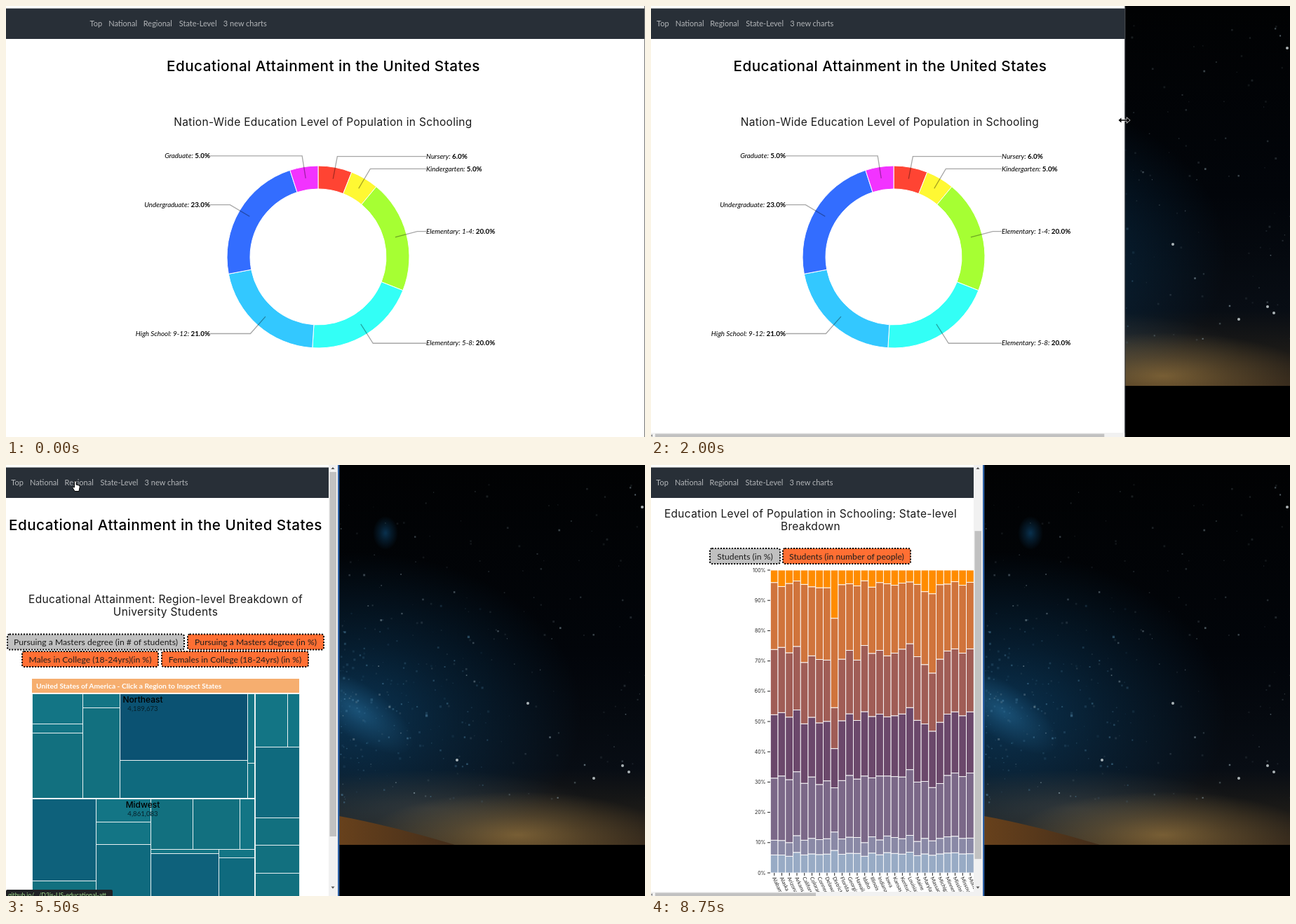
Write an HTML page that moves like this. It is 911 px wide and 615 px high and loops after 9000 ms.

```html
<!DOCTYPE html>
<html lang="en">
<head>
<meta charset="utf-8">
<title>Educational Attainment</title>
<style>
  html, body { margin: 0; width: 100%; height: 100%; overflow: hidden; background: #000; }
  svg { display: block; width: 100vw; height: 100vh; }
  text { font-family: Lato, "Open Sans", sans-serif; }
  .mid { text-anchor: middle; }
  .end { text-anchor: end; }
  .head, .sub, .region, .tick { font-family: Inter, "Open Sans", sans-serif; }
  .head { font-size: 20.7px; font-weight: 500; letter-spacing: .45px; }
  .sub { font-size: 15.5px; letter-spacing: .33px; fill: #1a1a1a; }
  .nav { font-size: 11px; fill: #b3b6b9; }
  .label { font-size: 9.85px; font-style: italic; }
  .label tspan { font-style: normal; font-weight: 700; }
  .button { font-size: 12.2px; fill: #1c1c1c; }
  .banner { font-size: 10.25px; font-weight: 700; fill: #fff; }
  .region { font-size: 12px; font-weight: 500; }
  .count { font-size: 9.6px; fill: #06202a; }
  .tick { font-size: 7px; fill: #222; }
  .state { font-size: 7.5px; fill: #222; }
  .status { font-size: 8.7px; fill: #9fdc8c; }
</style>
</head>
<body>
<svg id="stage" viewBox="0 0 911 615" preserveAspectRatio="none"></svg>
<script>
const LOOP = 9000, STEP = 250;
const stage = document.getElementById('stage');

const rect = (x, y, w, h, fill, extra = '') =>
  `<rect x="${x}" y="${y}" width="${w}" height="${h}" fill="${fill}" ${extra}/>`;
const text = (x, y, s, cls, extra = '') =>
  `<text x="${x}" y="${y}" class="${cls}" ${extra}>${s}</text>`;
const path = (d, fill, extra = '') => `<path d="${d}" fill="${fill}" ${extra}/>`;
const group = (id, body) => `<g id="${id}">${body}</g>`;
const polar = (r, turn) => [r * Math.sin(turn * 2 * Math.PI), -r * Math.cos(turn * 2 * Math.PI)];

function randomizer(seed) {
  return () => (seed = (seed * 16807) % 2147483647) / 2147483647;
}

function sky() {
  const rnd = randomizer(77);
  let stars = '';
  const star = (x, y, size, color, alpha) => {
    stars += rect(x.toFixed(1), y.toFixed(1), size.toFixed(1), size.toFixed(1), color, `opacity="${alpha.toFixed(2)}"`);
  };
  for (let i = 0; i < 190; i++)
    star(476 + 435 * rnd() ** 1.2, 25 + 455 * rnd(), 1 + 2 * rnd(), '#8fa3ad', .1 + .5 * rnd() ** 3);
  // denser bluish specks around the bright patch
  for (let i = 0; i < 170; i++)
    star(476 + 210 * rnd() ** 1.6, 345 + 150 * (rnd() + rnd() - 1), 1 + 2.5 * rnd(), '#5f9cbf', .08 + .35 * rnd() ** 2);
  for (const [x, y] of [[879, 429], [888, 438], [744, 340], [838, 447], [643, 421], [907, 60]])
    stars += `<circle cx="${x}" cy="${y}" r="2" fill="#d5dde0" opacity=".8"/>`;
  const glow = (id, color, alpha) =>
    `<radialGradient id="${id}"><stop stop-color="${color}" stop-opacity="${alpha}"/>` +
    `<stop offset=".45" stop-color="${color}" stop-opacity="${alpha * .5}"/>` +
    `<stop offset="1" stop-color="${color}" stop-opacity="0"/></radialGradient>`;
  const ellipse = (x, y, rx, ry, id, extra = '') =>
    `<ellipse cx="${x}" cy="${y}" rx="${rx}" ry="${ry}" fill="url(#${id})" ${extra}/>`;
  return `<defs>
    <linearGradient id="night" x2="0" y2="1">
      <stop stop-color="#010203"/><stop offset=".5" stop-color="#02050a"/>
      <stop offset=".8" stop-color="#080d14"/><stop offset=".9" stop-color="#1a1917"/>
      <stop offset="1" stop-color="#30251a"/></linearGradient>
    <linearGradient id="soil" x2="1"><stop stop-color="#6f451c"/><stop offset="1" stop-color="#432d1a"/></linearGradient>
    ${glow('blue', '#0c4066', .75)}${glow('core', '#2a709c', .5)}${glow('dawn', '#a07d42', .65)}${glow('haze', '#4a4a48', .5)}
    <clipPath id="photo"><rect width="911" height="542"/></clipPath></defs>
    ${rect(0, 0, 911, 615, '#000')}
    <g clip-path="url(#photo)">${rect(0, 0, 911, 542, 'url(#night)')}
    ${ellipse(500, 355, 320, 230, 'blue')}
    ${ellipse(500, 350, 95, 38, 'core', 'transform="rotate(35 500 350)"')}
    ${ellipse(541, 97, 18, 24, 'blue')}${ellipse(600, 490, 240, 55, 'haze')}${ellipse(730, 528, 215, 62, 'dawn')}
    ${stars}${path('M440 494L475 501C530 511 590 527 640 542H440z', 'url(#soil)')}</g>`;
}

function donut() {
  const slices = [
    ['Nursery', 6, '#ff4433'], ['Kindergarten', 5, '#fff833'], ['Elementary: 1-4', 20, '#a6ff33'],
    ['Elementary: 5-8', 20, '#33fff6'], ['High School: 9-12', 21, '#33c8ff'],
    ['Undergraduate', 23, '#336dff'], ['Graduate', 5, '#f233ff']];
  let from = 0, ring = '', leaders = '', labels = '';
  for (const [name, share, color] of slices) {
    const to = from + share / 100, mid = (from + to) / 2;
    ring += path(`M${polar(130, from)}A130 130 0 0 1 ${polar(130, to)}` +
      `L${polar(97, to)}A97 97 0 0 0 ${polar(97, from)}z`, color, 'stroke="#fff"');
    const elbow = polar(146, mid), side = mid < .5 ? 1 : -1;
    leaders += path(`M${polar(113.5, mid)}L${elbow}H${side * 154}`, 'none',
      'stroke="#000" stroke-opacity=".35" stroke-width="1.3"');
    labels += text(side * 154, elbow[1] + 3.2, `${name}: <tspan>${share.toFixed(1)}%</tspan>`,
      side > 0 ? 'label' : 'label end');
    from = to;
  }
  return `<g transform="translate(0 358)">${ring}${leaders}${labels}</g>`;
}

const button = (x, y, w, label, fill) =>
  rect(x + 1, y + 1, w - 2, 22, fill, 'rx="3" stroke="#000" stroke-width="2" stroke-dasharray="2 2"') +
  text(x + w / 2, y + 16.5, label, 'button mid');
const GREY = '#c0c0c0', ORANGE = '#ff6f33';

function treemap() {
  const teal = ['#137585', '#12707f', '#0f6a7e', '#0b5272', '#0e617b'];
  // left, top, right, bottom, shade
  const cells = `37 326 109 369 0|37 369 109 382 0|37 382 109 475 1|109 326 162 346 0|109 346 162 475 1
    |162 326 344 421 3|162 421 344 475 2|344 326 354 425 0|344 425 354 475 0
    |355 326 401 402 0|401 326 418 402 0|355 402 418 503 2|355 503 418 542 1|355 542 418 582 1|355 582 418 622 1
    |37 476 128 593 4|37 593 128 622 1|128 476 206 509 0|128 509 206 541 0|128 541 206 622 2
    |206 476 266 548 1|266 476 333 548 1|333 476 354 548 0|206 548 303 554 0|206 554 303 622 4
    |303 548 354 560 0|303 560 354 622 2`;
  return cells.split('|').map(cell => {
    const [l, t, r, b, shade] = cell.trim().split(' ').map(Number);
    return rect(l + .5, t + .5, r - l, b - t, teal[shade], 'stroke="#e9f2f3"');
  }).join('') +
    text(195, 339, 'Northeast', 'region mid') + text(195, 350.5, '4,189,673', 'count mid') +
    text(195, 489, 'Midwest', 'region mid') + text(195, 500.5, '4,861,083', 'count mid');
}

function regionPage() {
  return text(227.5, 197, 'Educational Attainment: Region-level Breakdown of', 'sub mid') +
    text(227.5, 215, 'University Students', 'sub mid') +
    button(1, 240.5, 254, 'Pursuing a Masters degree (in # of students)', GREY) +
    button(258, 240.5, 196, 'Pursuing a Masters degree (in %)', ORANGE) +
    button(22, 265, 196, 'Males in College (18-24yrs)(in %)', ORANGE) +
    button(221, 265, 211, 'Females in College (18-24yrs) (in %)', ORANGE) +
    rect(37, 305, 381, 20, '#f6ae6f') +
    text(43, 318.8, 'United States of America - Click a Region to Inspect States', 'banner') +
    treemap();
}

function stackedBars() {
  const states = ('Alabama Alaska Arizona Arkansas California Colorado Connecticut Delaware District Florida ' +
    'Georgia Hawaii Idaho Illinois Indiana Iowa Kansas Kentucky Louisiana Maine Maryland Massachusetts ' +
    'Michigan Minnesota Mississippi Missouri Montana').split(' ');
  const colors = ['#98abc5', '#8a89a6', '#7b6888', '#6b486b', '#a05d56', '#d0743c', '#ff8c00'];
  const middle = [10.8, 10.7, 10, 12.3, 10.8, 11.4, 11, 11.3, 13.5, 11.2, 11.8, 11.7, 10, 11.9,
    10.9, 12.2, 11.7, 11.3, 12.4, 10.4, 11.4, 10.6, 11.4, 11.9, 12.1, 11.4, 11.5];
  const elementary = [31.3, 32, 30.8, 33.4, 29.6, 31.7, 29.2, 30.4, 28.1, 30.5, 32.2, 31, 32, 31.4,
    32, 32, 31.8, 31.7, 34.1, 30, 30.2, 28.2, 29.5, 32.2, 33, 31.8, 33];
  const school = [73.8, 74.5, 72.7, 74.8, 69.5, 71.7, 70.5, 70.3, 54.6, 70.6, 73.5, 70.3, 75.1, 72.5,
    73.5, 71.7, 72.6, 73.9, 75.7, 71.4, 68.8, 66, 70.6, 73.3, 74, 72.6, 74];
  const college = [95.9, 94.6, 95.6, 96.4, 95.3, 94.5, 94.2, 94.2, 84.1, 95.2, 95.5, 94.8, 96.5, 94.4,
    95.9, 95.5, 95, 95.7, 96.1, 95.3, 92.9, 92.2, 95.2, 95.4, 96.2, 95, 96];
  const y = p => 704 - 4.32 * p;
  let out = '';
  states.forEach((name, i) => {
    const x = 170.3 + i * 10.74;
    const half = (elementary[i] + school[i]) / 2 - .3;
    const tops = [middle[i] * .55, middle[i], elementary[i], half, school[i], college[i], 100];
    tops.forEach((top, k) => {
      const base = k ? tops[k - 1] : 0;
      out += rect(x, y(top), 10.74, 4.32 * (top - base), colors[k], 'stroke="#fff" stroke-width=".9"');
    });
    out += rect(x + 5, 704, 1, 4, '#222') +
      text(0, 0, name, 'state', `transform="translate(${x + 2.5} 711) rotate(65)"`);
  });
  for (let p = 0; p <= 100; p += 10)
    out += text(163.5, y(p) + 2.6, p + '%', 'tick end') + rect(166, y(p) - .5, 4, 1, '#222');
  return out;
}

function statePage() {
  return text(227.5, 196.5, 'Education Level of Population in Schooling: State-level', 'sub mid') +
    text(227.5, 214.5, 'Breakdown', 'sub mid') +
    button(83, 240, 102, 'Students (in %)', GREY) +
    button(187, 240, 184, 'Students (in number of people)', ORANGE) +
    stackedBars();
}

const navItems = [[0, 'Top'], [26.7, 'National'], [76.3, 'Regional'], [127.3, 'State-Level'], [190.3, '3 new charts']];
const outlined = 'stroke="#fff" stroke-width="1.2" paint-order="stroke"';

stage.innerHTML = sky() + `
  <clipPath id="window"><rect id="windowClip" height="615"/></clipPath>
  <g clip-path="url(#window)">
    ${rect(0, 0, 911, 615, '#fff')}
    <g id="content">
      ${group('heading', text(0, 92.5, 'Educational Attainment in the United States', 'head mid'))}
      ${group('national', group('nationalTitle',
        text(-.5, 171, 'Nation-Wide Education Level of Population in Schooling', 'sub mid')) + group('donut', donut()))}
      ${group('regional', regionPage())}
      ${group('states', statePage())}
    </g>
    ${rect(0, 0, 911, 4, '#fdfffd')}${rect(0, 3.5, 911, 43.5, '#282f37')}
    ${group('menu', navItems.map(([x, s]) => text(x, 29, s, 'nav')).join(''))}
    <g id="bottomBar">${rect(0, 609, 911, 6, '#f1f1f1')}
      <rect id="bottomThumb" x="6" y="610.5" height="5" fill="#c1c1c1"/>
      ${path('M2 611v4l-2-2z', '#777')}</g>
    <g id="sideBar">${rect(460, 0, 13, 615, '#f1f1f1')}
      <rect id="sideThumb" x="461.5" width="9.5" fill="#c1c1c1"/>
      ${path('M463.5 6h5l-2.5-3z', '#555')}${path('M463.5 601.5h5l-2.5 3z', '#555')}</g>
    <g id="status"><rect id="statusBox" y="606" height="12" rx="2" fill="#202124"/>
      ${text(3, 616.5, 'github.io/.../D3js-US-educational-att...', 'status')}</g>
  </g>
  <rect id="frame" y="0" height="615"/>
  ${group('resize', path('M-8 0L-4-3.5V-.8H4V-3.5L8 0L4 3.5V.8H-4V3.5z', '#000', outlined))}
  ${group('pointer', path('M0 0V13L3 10.2L5 15L7 14L5 9.5H9z', '#fff', 'stroke="#000"'))}
  ${group('hand', path('M-2.5-6.5q1.3-1.5 2.6 0V-2L4-1Q5.5-.5 5.2 1.5L4 7.5H-2L-5 2.5Q-5 .3-2.5 2z', '#fff', 'stroke="#000"'))}`;

const el = id => document.getElementById(id);
const show = (id, on) => el(id).setAttribute('visibility', on ? 'visible' : 'hidden');
const move = (id, x, y = 0) => el(id).setAttribute('transform', `translate(${x} ${y})`);
const set = (id, attrs) => Object.entries(attrs).forEach(([k, v]) => el(id).setAttribute(k, v));

// Each key is [time, ...values]; values are linear between keys.
function track(keys, t) {
  const next = keys.findIndex(k => k[0] > t);
  if (next === 0) return keys[0].slice(1);
  if (next < 0) return keys[keys.length - 1].slice(1);
  const a = keys[next - 1], b = keys[next], u = (t - a[0]) / (b[0] - a[0]);
  return a.slice(1).map((v, i) => v + (b[i + 1] - v) * u);
}

// window width, centre of the page
const windowKeys = [[750, 910, 452.5], [1500, 814, 414], [2000, 675.5, 341], [3000, 540, 268],
  [3250, 540, 268], [4000, 473, 233.5]];
const resizeKeys = [[1000, 893, 145], [1500, 809.5, 152.5], [2000, 674.5, 163], [3000, 546.5, 175.5],
  [3250, 546.5, 175.5], [4000, 466, 177]];
const pointerKeys = [[4500, 440, 165], [5000, 180, 60]];
const handKeys = [[6000, 100, 30], [6500, 165, 41]];
const scrollKeys = [[7750, 0], [8500, 122]];

function render(time) {
  const t = Math.floor(time / STEP) * STEP;
  const page = t < 5500 ? 'national' : t < 7500 ? 'regional' : 'states';
  const [width, center] = track(windowKeys, t);
  const [scroll] = track(scrollKeys, t);
  const tall = page !== 'national';
  const layout = tall ? 460 : width;
  const middle = tall ? 227.5 : center;

  ['national', 'regional', 'states'].forEach(id => show(id, id === page));
  set('windowClip', { width });
  move('content', 0, -scroll);
  move('heading', middle);
  move('nationalTitle', middle);
  move('donut', Math.max(346, center - 7.5));
  move('menu', Math.max(7.3, center - 333));

  const wide = page === 'states' ? 900 : 700;
  show('bottomBar', page !== 'regional' && layout < 690);
  set('bottomThumb', { width: (layout - 12) * Math.min(1, layout / wide) });
  show('sideBar', tall);
  set('sideThumb', { y: 10 + scroll * .69, height: page === 'states' ? 468 : 520 });
  show('status', t >= 5250 && t < 8750);
  set('statusBox', { width: t === 8500 ? 276 : 152 });

  const thin = t < 2250;
  set('frame', {
    x: width,
    width: thin ? 1 : 2.3,
    fill: t < 1000 ? '#777' : thin ? '#30343a' : t < 4250 ? '#4a80c6' : '#2f63a8'
  });

  show('resize', t >= 1000 && t < 4500);
  move('resize', ...track(resizeKeys, t));
  show('pointer', t >= 4500 && t < 5250);
  move('pointer', ...track(pointerKeys, t));
  show('hand', t >= 5250 && t < 8000);
  move('hand', ...track(handKeys, t));
}

const start = performance.now();
function tick() {
  render((performance.now() - start) % LOOP);
  requestAnimationFrame(tick);
}
tick();
</script>
</body>
</html>
```
